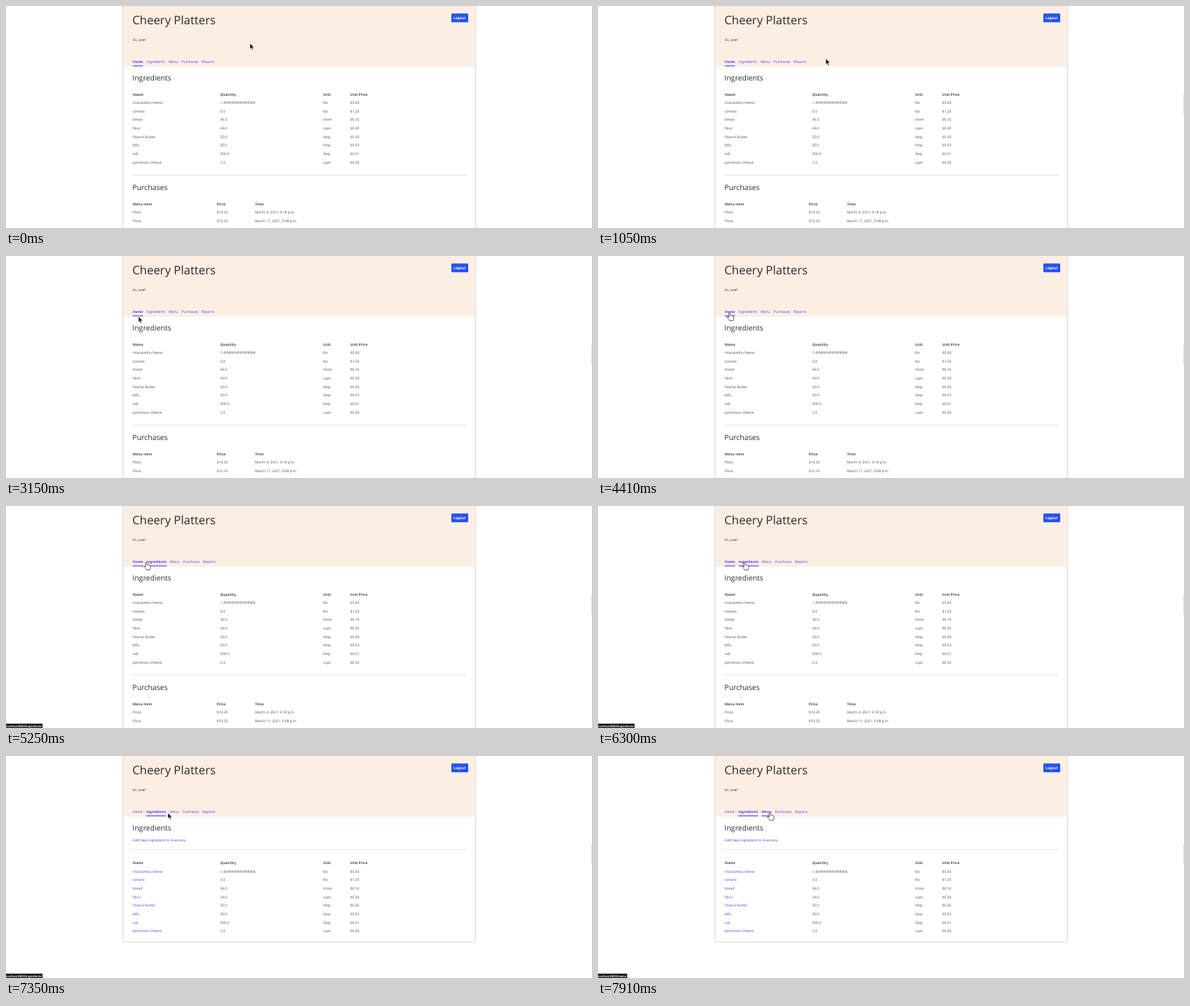
Animation, 800 px wide and 304 px high, one loop 8 s. Source, as an HTML page:

```html
<!DOCTYPE html>
<html lang="en">
<head>
<meta charset="utf-8">
<title>Restaurant inventory</title>
<style>
  html, body { margin: 0; width: 100%; height: 100%; overflow: hidden; background: #fff; }
  svg { display: block; width: 800px; height: 304px; }
  text { font: 4.8px "Open Sans", "Noto Sans", sans-serif; fill: #4c4c4c; text-rendering: geometricPrecision; }
  .title { font-size: 16px; fill: #2c2c2c; }
  .h2 { font-size: 10.1px; fill: #2e2e2e; }
  .dark { fill: #303030; }
  .bold { font-weight: 700; }
  .th { font-weight: 700; fill: #484848; }
  .link { fill: #4742f5; }
  .white { fill: #fff; }
  .card { fill: #fff; filter: drop-shadow(0 .6px 1.2px rgba(0, 0, 0, .4)); }
  .rule { fill: #d9d9d9; }
  .status { font-size: 3.85px; font-weight: 600; fill: #fff; }
</style>
</head>
<body>
<svg id="stage" viewBox="0 0 800 304" xmlns="http://www.w3.org/2000/svg">
  <rect class="card" id="card" x="160" y="-10" width="480.5" rx="1.5"/>
  <rect x="160" width="480.5" height="83" fill="#fdeee3"/>
  <text class="title" x="172.5" y="25">Cheery Platters</text>
  <text class="dark" x="173" y="48">Hi, user!</text>
  <rect x="608" y="10.2" width="23" height="12" rx="1" fill="#2352f6"/>
  <text class="white bold" x="611" y="18">Logout</text>
  <g id="nav"></g>
  <text class="h2" x="172.6" y="101.6">Ingredients</text>
  <g id="home"></g>
  <g id="inventory"></g>
  <rect id="edge" x="799" y="122" width="1" height="26" fill="#dedede"/>
  <g id="status">
    <rect id="statusBox" x="-2" y="298" height="8" rx="1" fill="#222"/>
    <text id="statusText" class="status" x="-1" y="302.7"></text>
  </g>
  <path id="arrow" d="M0 0V8.2L1.9 6.5 3.2 9.5 4.6 8.9 3.3 6H5.9Z" fill="#111" stroke="#fff" stroke-width=".6"/>
  <path id="hand" d="M-1 .9C-1-.2.8-.2.9.9L1.2 3.8C1.6 3.2 2.7 3.3 2.8 4 3.3 3.6 4.2 3.8 4.3 4.5 4.9 4.2 5.7 4.5 5.7 5.3V7.6C5.7 8.7 5 9.2 4.9 10.6H.2C0 9.3-1.5 8.3-3.4 6.4-4.2 5.5-3 4.7-2.1 5.4L-.7 6.5Z" fill="#fff" stroke="#333" stroke-width=".75" stroke-linejoin="round"/>
</svg>
<script>
const LOOP = 8000, STEP = 70, PITCH = 11.65;
const $ = id => document.getElementById(id);

function add(parent, tag, attrs, text = "") {
  const node = document.createElementNS("http://www.w3.org/2000/svg", tag);
  for (const key in attrs) node.setAttribute(key, attrs[key]);
  node.textContent = text;
  parent.append(node);
  return node;
}

function table(parent, cols, y, head, rows, firstClass = "") {
  head.forEach((s, i) => add(parent, "text", { x: cols[i], y, class: "th" }, s));
  rows.forEach((row, r) => row.forEach((s, i) =>
    add(parent, "text", { x: cols[i], y: y + 11.5 + r * PITCH, class: i ? "" : firstClass }, s)));
}

function rule(parent, y) {
  add(parent, "rect", { x: 173, y, width: 456, height: 0.8, class: "rule" });
}

const stock = [
  ["mozzarella cheese", "1.4999999999999984", "lbs", "$3.00"],
  ["tomato", "0.0", "lbs", "$1.20"],
  ["bread", "36.0", "slices", "$0.10"],
  ["flour", "34.0", "cups", "$0.30"],
  ["Peanut Butter", "20.0", "tbsp", "$0.05"],
  ["Jelly", "50.0", "tbsp", "$0.03"],
  ["salt", "500.0", "tbsp", "$0.01"],
  ["parmesan cheese", "2.0", "cups", "$0.55"]
];
const sales = [
  ["Pizza", "$10.20", "March 4, 2021, 4:18 p.m."],
  ["Pizza", "$10.20", "March 11, 2021, 9:08 p.m."],
  ["Pizza", "$10.20", "March 11, 2021, 9:08 p.m."]
];
const stockCols = [173, 292.5, 433, 470];
const stockHead = ["Name", "Quantity", "Unit", "Unit Price"];

table($("home"), stockCols, 122.6, stockHead, stock);
rule($("home"), 231);
add($("home"), "text", { x: 172.6, y: 251.6, class: "h2" }, "Purchases");
table($("home"), [173, 287.8, 340], 272.8, ["Menu Item", "Price", "Time"], sales);

add($("inventory"), "text", { x: 173, y: 117.3, class: "link" }, "Add New Ingredient to Inventory");
rule($("inventory"), 127.6);
table($("inventory"), stockCols, 148.3, stockHead, stock, "link");

// Bold labels are wider and push the following ones to the right.
const nav = [
  ["Home", 173, 14, 0.7], ["Ingredients", 191.3, 27, 1.8], ["Menu", 221.5, 13.5, 0.7],
  ["Purchases", 239.1, 0, 0], ["Reports", 266.3, 0, 0]
].map(([label, x, width, extra]) => ({
  x, extra,
  text: add($("nav"), "text", { y: 77.7 }, label),
  line: add($("nav"), "rect", { y: 81.3, width, height: 1.3, fill: "#645fff" })
}));

function drawNav(bold) {
  let shift = 0;
  nav.forEach(({ x, extra, text, line }, i) => {
    const on = bold.includes(i);
    text.setAttribute("x", x + shift);
    line.setAttribute("x", x + shift);
    text.setAttribute("class", on ? "link bold" : "link");
    line.style.display = on ? "" : "none";
    if (on) shift += extra;
  });
}

// Pointer path: time, x, y
const path = [
  [0, 333, 51], [280, 333, 51], [700, 310.5, 73], [980, 310.5, 73],
  [1050, 311, 72], [1680, 325, 41], [1750, 325, 41], [1820, 325, 40],
  [1890, 325, 40], [2240, 303, 58], [2520, 228, 79], [2660, 192, 83],
  [2800, 192, 83], [2940, 181.5, 83], [3080, 181.5, 83], [3290, 179.5, 82],
  [3430, 179.5, 82], [3640, 179.5, 80], [4340, 179.5, 80], [4410, 179.5, 78],
  [4550, 180, 77.5], [5040, 180, 77.5], [5250, 191.5, 77], [5390, 193, 77],
  [5600, 193, 77], [5810, 196, 77], [5880, 196, 77], [6090, 201, 76.5],
  [6160, 201, 76.5], [6300, 200, 77], [6580, 200, 77], [6790, 213, 76.5],
  [7420, 222, 78], [7910, 234.5, 77.5], [LOOP, 234.5, 77.5]
];

function pointer(t) {
  const i = path.findIndex(p => p[0] > t);
  const [t0, x0, y0] = path[i - 1], [t1, x1, y1] = path[i];
  const k = (t - t0) / (t1 - t0);
  return [x0 + (x1 - x0) * k, y0 + (y1 - y0) * k];
}

const show = (id, on) => { $(id).style.display = on ? "" : "none"; };

function draw(t) {
  const [x, y] = pointer(t);
  const onInventory = t >= 6440;
  const onMenu = t >= 7490;
  const inGap = (x > 188 && x < 191) || (x > 219.5 && x < 223);
  const hand = t >= 4410 && !inGap;

  show("home", !onInventory);
  show("inventory", onInventory);
  $("card").setAttribute("height", onInventory ? 264 : 340);
  drawNav([onInventory ? 1 : 0, onMenu ? 2 : t >= 5250 ? 1 : 0].filter(i => i || !onInventory));

  const [page, width] = onMenu ? ["menu/", 40] : t >= 5250 ? ["ingredients/", 50] : ["", 29];
  show("status", t >= 4690);
  $("statusText").textContent = "localhost:8080/" + page;
  $("statusBox").setAttribute("width", width + 2);

  show("edge", t >= 350);
  show("hand", hand);
  show("arrow", !hand);
  $(hand ? "hand" : "arrow").setAttribute("transform", `translate(${x} ${y})`);
}

const start = performance.now();
function tick() {
  const t = (performance.now() - start) % LOOP;
  draw(Math.floor(t / STEP) * STEP);
  requestAnimationFrame(tick);
}
tick();
</script>
</body>
</html>
```
